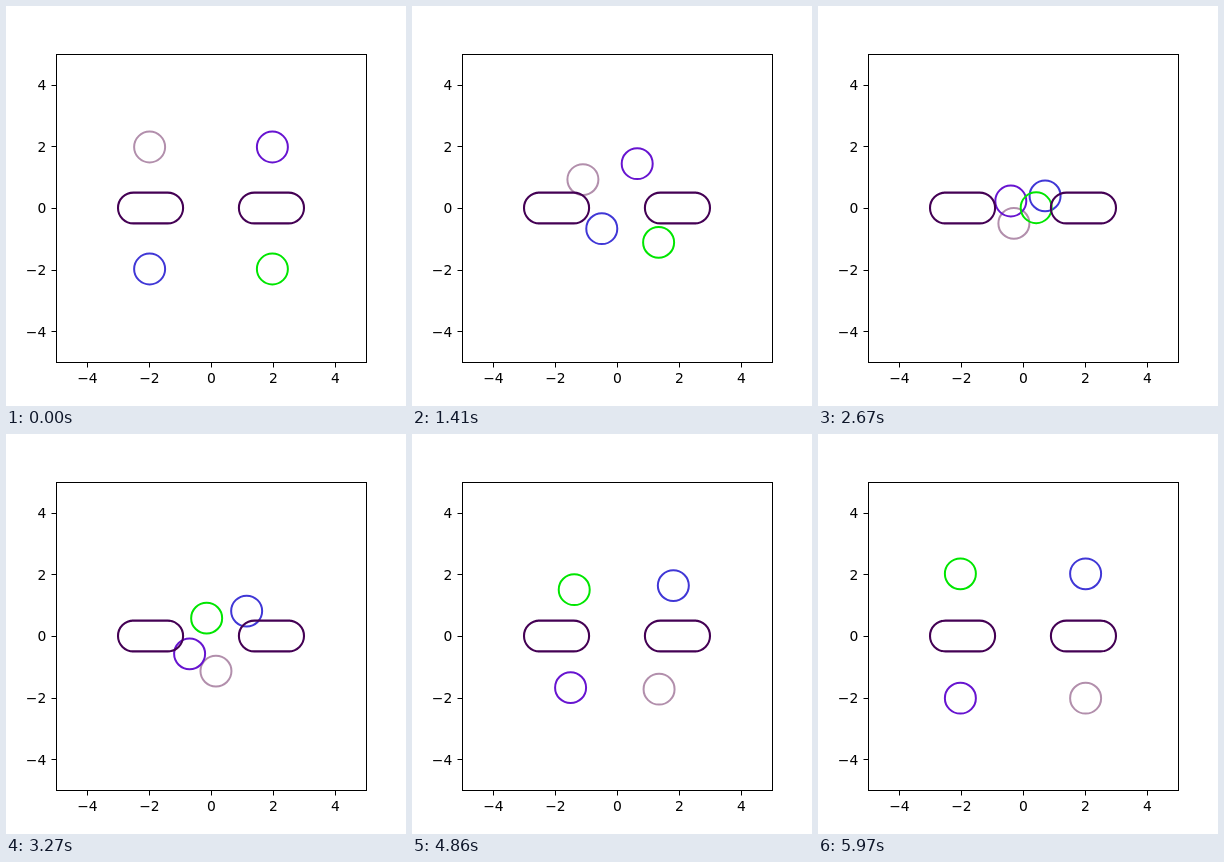
An HTML page that plays this animation: 400 by 400 pixels, repeating every 6 s.

```html
<!DOCTYPE html>
<html>
<head>
<meta charset="utf-8">
<style>
html, body { margin: 0; width: 100%; height: 100%; overflow: hidden; background: #fff; }
svg { display: block; width: 400px; height: 400px; }
text { font: 13.89px "DejaVu Sans", sans-serif; fill: #000; }
</style>
</head>
<body>
<svg id="plot" viewBox="0 0 400 400" fill="none"></svg>
<script>
const plot = document.getElementById('plot');
const toX = x => 205 + 31 * x;
const toY = y => 202 - 30.8 * y;

function add(tag, attrs, text = '') {
  const el = document.createElementNS('http://www.w3.org/2000/svg', tag);
  for (const key in attrs) el.setAttribute(key, attrs[key]);
  el.textContent = text;
  return plot.appendChild(el);
}

// Each agent swaps to the opposite corner, swerving through a few waypoints
const times = [0, 750, 2040, 3270, 4110, 5970];
const agents = [
  { color: '#b28fac', corner: [-2, 2],
    via: [[-1.48, 1.5], [-0.73, 0.28], [0.16, -1.14], [0.85, -1.49]] },
  { color: '#6714d0', corner: [2, 2],
    via: [[1.37, 1.69], [0, 1.04], [-0.69, -0.58], [-1.13, -1.3]] },
  { color: '#4037d6', corner: [-2, -2],
    via: [[-1.21, -1.3], [0.16, -0.1], [1.15, 0.81], [1.59, 1.31]] },
  { color: '#00e600', corner: [2, -2],
    via: [[1.65, -1.56], [0.97, -0.62], [-0.14, 0.58], [-0.87, 1.11]] }
];

function spline(values) {
  const last = times.length - 2;
  const clamp = i => Math.max(0, Math.min(last, i));
  const gap = i => times[clamp(i) + 1] - times[clamp(i)];
  const slope = i => (values[clamp(i) + 1] - values[clamp(i)]) / gap(i);
  const tangent = i =>
    (slope(i - 1) * gap(i) + slope(i) * gap(i - 1)) / (gap(i - 1) + gap(i));
  return t => {
    let i = 0;
    while (i < last && t >= times[i + 1]) i++;
    const h = gap(i), u = (t - times[i]) / h, v = 1 - u;
    return v * v * ((1 + 2 * u) * values[i] + u * h * tangent(i))
      + u * u * ((3 - 2 * u) * values[i + 1] - v * h * tangent(i + 1));
  };
}

for (const agent of agents) {
  const { color, corner, via } = agent;
  const path = [corner.map(c => 0.99 * c), ...via, corner.map(c => -1.01 * c)];
  agent.el = add('ellipse', { rx: 15.5, ry: 15.4, stroke: color, 'stroke-width': 2 });
  agent.x = spline(path.map(p => p[0]));
  agent.y = spline(path.map(p => p[1]));
}

for (const x of [-3, 0.9]) {
  add('rect', { x: toX(x), y: toY(0.5), width: 65.1, height: 30.8, rx: 15.5, ry: 15.4,
    stroke: '#440154', 'stroke-width': 2.08 });
}

add('rect', { x: 50.5, y: 48.5, width: 310, height: 308, stroke: '#000' });
for (let n = -4; n <= 4; n += 2) {
  const label = String(n).replace('-', '\u2212');
  const x = toX(n), y = toY(n);
  add('path', { d: `M${x + 0.5} 356.5v5M50.5 ${Math.round(y) + 0.5}h-5`, stroke: '#000' });
  add('text', { x: x + 0.4, y: 377, 'text-anchor': 'middle' }, label);
  add('text', { x: 40.3, y: Math.ceil(y) + 5, 'text-anchor': 'end' }, label);
}

function draw() {
  const t = Math.floor(performance.now() % 6000 / 30) * 30;
  for (const { el, x, y } of agents) {
    el.setAttribute('cx', toX(x(t)));
    el.setAttribute('cy', toY(y(t)));
  }
  requestAnimationFrame(draw);
}
draw();
</script>
</body>
</html>
```
